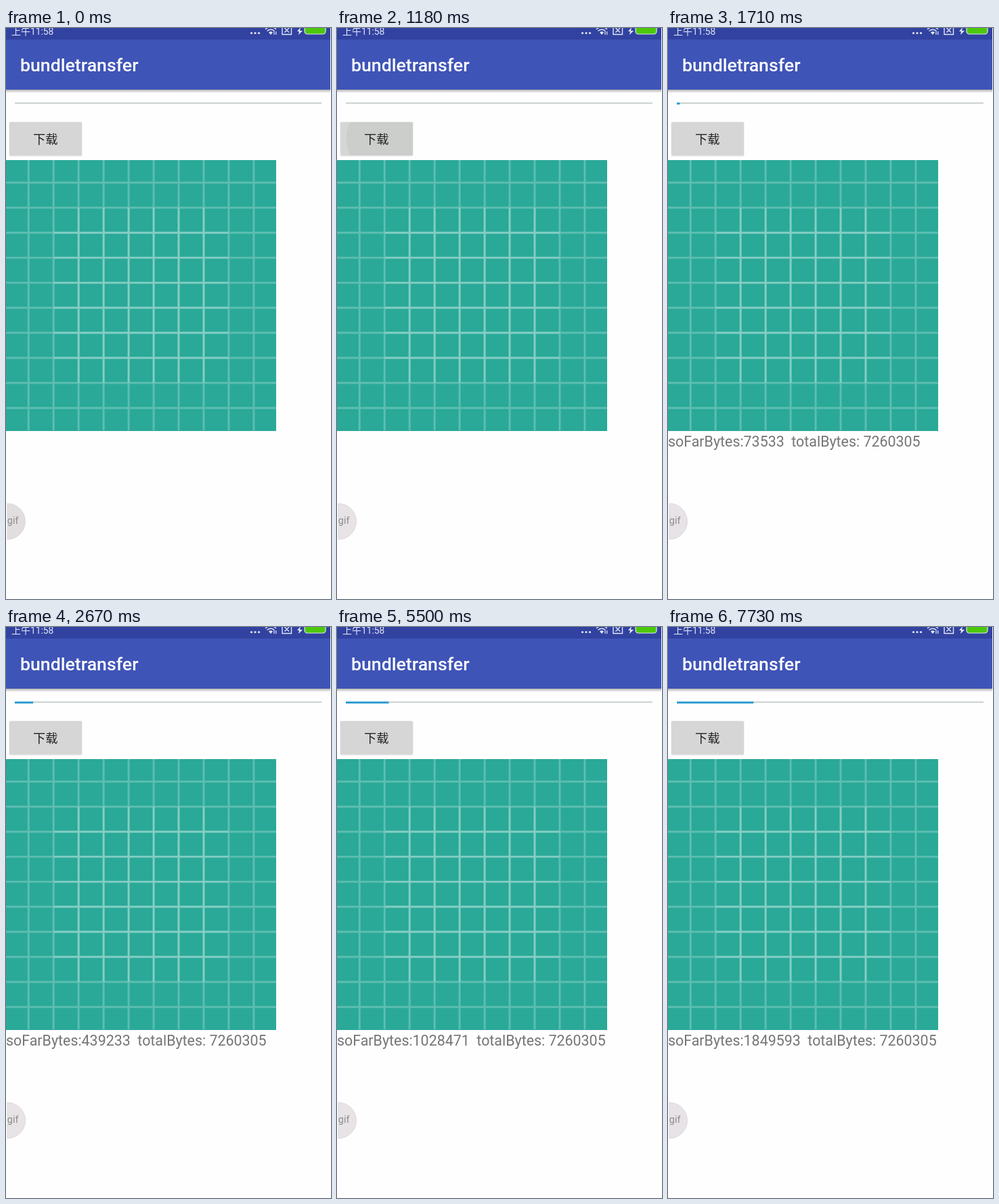
These frames come from a looping animation (480x843 px, 8000 ms). An HTML page:

```html
<!DOCTYPE html>
<html lang="zh">
<head>
<meta charset="utf-8">
<title>Download progress</title>
<style>
html, body { margin: 0; width: 100%; height: 100%; overflow: hidden; background: #fefefe; }
svg { display: block; width: 100%; height: 100%; }
text { font-family: Roboto, "Noto Sans CJK SC", "Noto Sans CJK", sans-serif; white-space: pre; }
.cjk { font-family: "Noto Sans CJK SC", "Noto Sans CJK", sans-serif; }
</style>
</head>
<body>
<svg viewBox="0 0 480 843" preserveAspectRatio="none">
  <defs>
    <linearGradient id="shade" x2="0" y2="1">
      <stop offset="0" stop-color="#000" stop-opacity=".3"/>
      <stop offset="1" stop-color="#000" stop-opacity="0"/>
    </linearGradient>
    <clipPath id="buttonClip"><rect x="5" y="139" width="107" height="49" rx="2"/></clipPath>
  </defs>
  <rect width="480" height="843" fill="#fefefe"/>

  <rect y="91" width="479" height="5" fill="url(#shade)"/>
  <rect width="479" height="91" fill="#3f54b7"/>
  <rect width="479" height="17" fill="#3142a0"/>
  <g fill="#e4e7f5">
    <text class="cjk" x="8" y="9.5" font-size="14">上午</text>
    <text x="36" y="10" font-size="13.8">11:58</text>
    <circle cx="362.5" cy="7.5" r="1.6"/>
    <circle cx="368" cy="7.5" r="1.6"/>
    <circle cx="373.5" cy="7.5" r="1.6"/>
    <path d="M388 6.5Q391 4 394 6.5L391 10Z"/>
    <path d="M396 5v5M398.8 5v5" stroke="#e4e7f5" stroke-width="1.2"/>
    <path d="M435-1l-5 6h3l-1 5 6-6h-4z"/>
  </g>
  <g fill="none" stroke="#e4e7f5" stroke-width="1.4">
    <path d="M383 2Q391-5 399 2M385.5 4.5Q391 0 396.5 4.5"/>
    <path d="M408-3V9.5H421.5V-3M411.5 0l6.5 6.5m0-6.5l-6.5 6.5"/>
  </g>
  <rect x="441" y="-5" width="31" height="14" rx="4" fill="#4cc80a" stroke="#e4e7f5" stroke-width="1.2"/>
  <text x="21" y="64" font-size="26.67" font-weight="500" fill="#fff">bundletransfer</text>

  <rect x="13" y="110" width="453" height="1.7" fill="#c3ccc9"/>
  <rect id="bar" x="13" y="110" height="3" fill="#339fd2"/>

  <rect x="4.5" y="138.5" width="108" height="51" rx="2.5" fill="#000" opacity=".1"/>
  <g clip-path="url(#buttonClip)">
    <rect x="5" y="139" width="107" height="49" fill="#d6d6d6"/>
    <circle id="ripple" cx="76" cy="164" fill="#cccecc"/>
  </g>
  <text class="cjk" x="40" y="171" font-size="18.3" fill="#212121">下载</text>

  <rect y="195" width="399" height="400" fill="#2aa998"/>
  <g transform="translate(0 195) scale(3.696)" fill="none" stroke="#fff" stroke-opacity=".24" stroke-width=".8">
    <path id="outer"/>
    <path id="inner"/>
  </g>

  <text id="status" x="0" y="618" font-size="21.4" fill="#757575"></text>

  <path id="bubble" d="M2 702a26.5 26.5 0 0 1 0 53z" stroke="#d8d2d6" stroke-width=".8"/>
  <text x="1.8" y="732" font-size="14.5" fill="#8c8c8c">gif</text>
</svg>
<script>
const LOOP = 8000, TOTAL = 7260305;
const el = id => document.getElementById(id);
const bar = el('bar'), ripple = el('ripple'), status = el('status'), bubble = el('bubble');
const clamp = v => Math.max(0, Math.min(1, v));

// Time in ms and the whole percent reached at that moment.
const progress = [
  [0, 0], [1710, 1], [2090, 3], [2280, 4], [2460, 5], [2670, 6], [2860, 7], [3060, 8],
  [3270, 9], [4700, 10], [5180, 11], [5260, 12], [5350, 13], [5500, 14], [5740, 15],
  [6150, 16], [6340, 17], [6580, 18], [6750, 19], [6840, 20], [6930, 21], [7020, 22],
  [7120, 24], [7730, 25]
];

function bytesAt(percent) {
  if (percent === 0) return 7293;
  if (percent <= 10) return 393 + 73140 * percent;
  if (percent <= 18) return Math.round(731793 + (percent - 10) * 74169.5);
  return Math.round(1325149 + (percent - 18) * 74920.57);
}

// Evenly spaced crossing lines; the inner set overlays the outer one to brighten it.
function gridPath(first, last, from, to) {
  let d = '';
  for (let at = first; at <= last; at += 10) d += `M${at} ${from}V${to}M${from} ${at}H${to}`;
  return d;
}

function draw(t) {
  const percent = progress.filter(([start]) => start <= t).pop()[1];
  bar.setAttribute('width', 4.53 * percent);
  status.textContent = t < 1520 ? '' : `soFarBytes:${bytesAt(percent)}  totalBytes: ${TOTAL}`;

  const pressed = t >= 830 && t < 1610;
  ripple.setAttribute('r', pressed ? 8 + 54 * clamp((t - 830) / 350) + 20 * clamp((t - 1180) / 100) : 0);
  ripple.setAttribute('opacity', 1 - clamp((t - 1230) / 380));

  bubble.setAttribute('fill', t < 100 ? '#e2dee0' : '#e8e3e6');
}

function frame() {
  draw(performance.now() % LOOP);
  requestAnimationFrame(frame);
}

el('outer').setAttribute('d', gridPath(9, 99, 0, 108));
el('inner').setAttribute('d', gridPath(29, 79, 19, 89));
frame();
</script>
</body>
</html>
```
